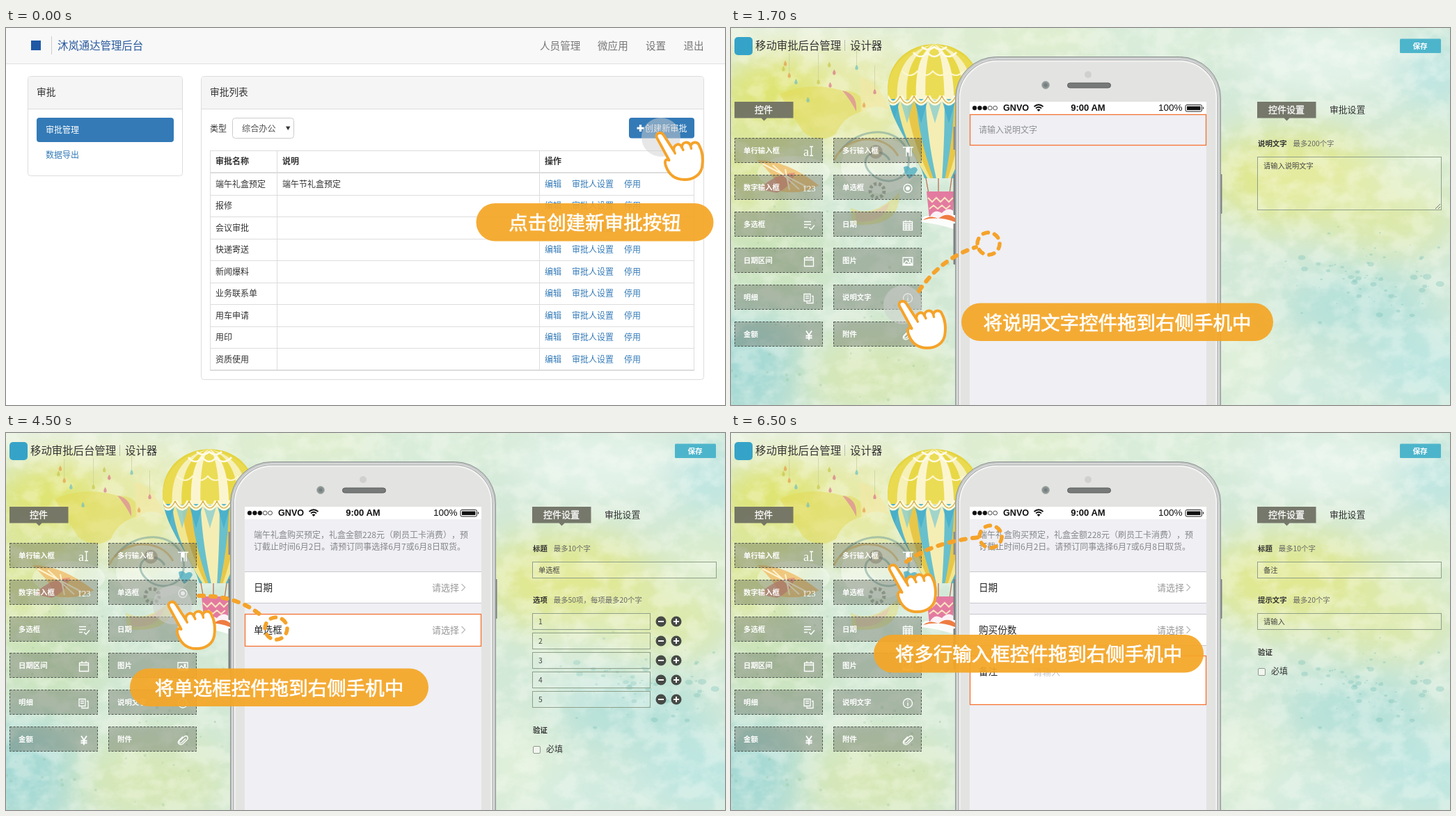
An HTML page for the animation above (8 s loop, 1033 by 542 pixels).

```html
<!DOCTYPE html>
<html lang="zh-CN">
<head>
<meta charset="utf-8">
<style>
html, body { margin: 0; width: 100%; height: 100%; overflow: hidden; background: #fff; }
svg { display: block; width: 1033px; height: 542px; }
text {
  font-family: "Noto Sans CJK SC", "Noto Sans CJK", "Noto Sans", sans-serif;
  text-spacing-trim: space-all;
  white-space: pre;
}
.latin { font-family: "Liberation Sans", Arial, sans-serif; }
.serif { font-family: "Liberation Serif", Times, serif; }
</style>
</head>
<body>
<svg id="stage" viewBox="0 0 1033 542" xmlns="http://www.w3.org/2000/svg"></svg>
<script>
const ORANGE = '#f5a32a', BLUE = '#337ab7', INK = '#333';

const text = (x, y, size, fill, str, extra = '') =>
  `<text x="${x}" y="${y}" font-size="${size}" fill="${fill}" ${extra}>${str}</text>`;
const rect = (x, y, w, h, fill, extra = '') =>
  `<rect x="${x}" y="${y}" width="${w}" height="${h}" fill="${fill}" ${extra}/>`;
const path = (d, fill, extra = '') => `<path d="${d}" fill="${fill}" ${extra}/>`;
const line = (d, color, width = 1, extra = '') =>
  path(d, 'none', `stroke="${color}" stroke-width="${width}" ${extra}`);
const circle = (x, y, r, fill, extra = '') => `<circle cx="${x}" cy="${y}" r="${r}" fill="${fill}" ${extra}/>`;
const ellipse = (x, y, rx, ry, fill, extra = '') =>
  `<ellipse cx="${x}" cy="${y}" rx="${rx}" ry="${ry}" fill="${fill}" ${extra}/>`;
const stroke = color => `stroke="${color}"`;
const BOLD = 'font-weight="700"', MID = 'text-anchor="middle"';

let seed = 7;
const rnd = () => (seed = (seed * 16807) % 2147483647) / 2147483647;
const repeat = (n, fn) => Array.from({ length: n }, (_, i) => fn(i)).join('');

// Pointer, banner and drag trail

const hand = (x, y) => `<g transform="translate(${x} ${y}) scale(.97)" stroke="${ORANGE}" stroke-width="4"
  stroke-linejoin="round" stroke-linecap="round">` +
  path('M-4 3C-7-4 2-7 6-1L21 22C20 13 30 9 33 17C33 9 43 7 46 15C48 8 57 8 59 15C63 22 65 34 63 46' +
    'C61 58 50 65 37 65C21 65 13 56 9 44C7 37 9 34 14 36Z', '#fff') +
  line('M21 22L23 26M33 17L35 21M46 15L47 19', ORANGE, 3.5) + '</g>';
const touch = (x, y) => circle(x, y, 28, '#d0d0d0', 'opacity=".5"');
const banner = (x, y, w, str) => rect(x, y, w, 54.5, '#f5a626', 'rx="27.2" opacity=".93"') +
  text(x + w / 2, y + 38, 27.5, '#fff', str, MID + ' stroke="#fff" stroke-width=".7"');
const trail = (d, cx, cy) =>
  line(d, ORANGE, 6, 'stroke-dasharray="7 10" stroke-linecap="round"') +
  circle(cx, cy, 16, 'none', `stroke="${ORANGE}" stroke-width="5.5" stroke-dasharray="7.3 9.45" stroke-linecap="round"`);

// Approval list page

function listPage() {
  const names = ['端午礼盒预定', '报修', '会议审批', '快递寄送', '新闻爆料', '业务联系单', '用车申请', '用印', '资质使用'];
  const panel = (x, w, h, title) =>
    rect(x + .5, 69.5, w, h, '#fff', 'rx="4" stroke="#ddd"') +
    path(`M${x + 1} 116V73q0-3 3-3h${w - 7}q3 0 3 3v43z`, '#f5f5f5') +
    line(`M${x} 116.5h${w}`, '#ddd') + text(x + 13, 97, 13.7, INK, title);
  const row = i => {
    const y = 228.5 + i * 31.5;
    return text(301, y, 12, INK, names[i]) +
      [[774, '编辑'], [813, '审批人设置'], [888, '停用']].map(([x, s]) => text(x, y, 12, BLUE, s)).join('') +
      line(`M293 ${Math.round(y + 11) + .5}H989`, '#ddd');
  };
  return rect(0, 0, 1033, 542, '#fff') + rect(0, 0, 1033, 51, '#f8f8f8') + line('M0 51.5H1033', '#e0e0e0') +
    rect(36, 18, 14, 14, '#1f58a5') + line('M65.5 12V38', '#ccc') +
    text(74, 31, 15.4, '#2a5b9e', '沐岚通达管理后台') +
    [[767, '人员管理'], [850, '微应用'], [919, '设置'], [973.5, '退出']]
      .map(([x, s]) => text(x, 30.5, 14.6, '#777', s)).join('') +
    panel(31, 222, 143, '审批') + rect(44, 129, 197, 35, BLUE, 'rx="4"') +
    text(57, 151, 12, '#fff', '审批管理') + text(57, 187, 12, BLUE, '数据导出') +
    panel(280, 722, 436, '审批列表') + text(293, 148.5, 12, INK, '类型') +
    rect(325.5, 129.5, 88, 29, '#fff', 'rx="4" stroke="#ccc"') + text(339, 149, 12.2, '#555', '综合办公') +
    path('M402 141.5h6.4l-3.2 5.5z', INK) +
    rect(895, 129, 94, 29.5, BLUE, 'rx="4"') + line('M906.5 144h10M911.5 139v10', '#fff', 3.2) +
    text(918, 148.5, 12.1, '#fff', '创建新审批') +
    rect(293.5, 176.5, 695, 315, 'none', stroke('#ddd')) +
    line('M389.5 176V492M766.5 176V492', '#ddd') + line('M293 208H989', '#ddd', 2) +
    text(301, 196, 12, INK, '审批名称', BOLD) + text(397, 196, 12, INK, '说明', BOLD) +
    text(774, 196, 12, INK, '操作', BOLD) + repeat(9, row) + text(397, 228.5, 12, INK, '端午节礼盒预定') +
    touch(941, 157) + hand(939, 155) + banner(675.5, 252, 341, '点击创建新审批按钮');
}

// Watercolour backdrop

function washes() {
  const spots = [
    [85, 95, 110, 60, '#dfe46c'], [20, 200, 80, 80, '#dce79f'], [190, 110, 70, 90, '#e6eaa6'],
    [60, 5, 180, 25, '#f1f5e4'], [260, 30, 80, 30, '#e6efcc'], [60, 330, 90, 60, '#cae3bb'],
    [20, 490, 80, 80, '#a6d9d4'], [210, 500, 110, 60, '#d6e7b5'], [250, 380, 80, 70, '#d2e8d3'],
    [430, 15, 130, 30, '#e4f0cc'], [640, 15, 110, 35, '#dceedb'], [860, 45, 130, 45, '#e6f4ec'],
    [1010, 70, 50, 60, '#bde5e2'], [810, 215, 130, 70, '#e0e891'], [940, 270, 100, 50, '#dde9a8'],
    [1000, 180, 50, 60, '#dbedcc'], [900, 400, 110, 55, '#b6e1d9'], [740, 480, 60, 70, '#e0f0da'],
    [1000, 490, 90, 60, '#bee6e1'], [850, 520, 90, 30, '#d2ece4']
  ];
  return rect(0, 0, 1033, 542, '#d3e9d8') +
    `<g filter="url(#soft)">${spots.map(s => ellipse(...s)).join('')}</g>` +
    rect(0, 0, 1033, 542, '#fff', 'filter="url(#grain)" opacity=".3"') +
    repeat(70, () => {
      const r = .6 + rnd() * rnd() * 4.5;
      return ellipse(905 + (rnd() + rnd() - 1) * 120, 355 + (rnd() + rnd() - 1) * 70, r * 1.5, r, '#6dbab0', 'opacity=".3"');
    }) +
    repeat(60, () => circle(rnd() * 320, 250 + rnd() * 290, .5 + rnd() * 2, '#8cba8c', 'opacity=".25"'));
}

function balloon() {
  const body = 'M225 92C223 50 255 23 292 23S359 48 359 92C359 138 330 178 320 216H278C268 178 228 138 225 92Z';
  // Vertical panel between two fractions of the width, tapering to the neck
  const edge = f => `C${292 + f * 92} 40 ${292 + f * 82} 130 ${299 + f * 21} 216`;
  const panel = (f, fill) => path(`M292 23${edge(f)}H${299 - f * 21}${`C${292 - f * 82} 130 ${292 - f * 92} 40 292 23Z`}`, fill);
  const panels = colors => colors.map((c, i) => panel(1 - i * .2, c)).join('');
  const hem = repeat(7, i => `M${223 + i * 20} 98q10 20 20 0`);
  return `<clipPath id="bag">${path(body, '#000')}</clipPath>
    <clipPath id="skirt"><rect x="220" y="102" width="145" height="120"/></clipPath>
    <g clip-path="url(#bag)">` + path(body, '#e5d440') +
    panels(['#e9da50', '#f6f0b9', '#e8d846', '#fbf5cf', '#ebdc55']) +
    `<g clip-path="url(#skirt)">${path(body, '#58b9cd')}` +
    panels(['#55b5ca', '#f2e690', '#e8c748', '#68c0cc', '#f5eeb4']) + '</g>' +
    repeat(7, i => path(`M${223 + i * 20} 103l10 34l10-34z`, i % 2 ? '#8dcfd0' : '#45aecb', 'opacity=".8"')) +
    line(hem, '#fff9dc', 7) + line(hem, '#d2a83c', 1.2) +
    line('M262 35q10 12 20 0q10 12 20 0q10 12 22 0M274 27q9 8 18 0q9 8 18 0', '#fffbe9', 2.5) +
    line('M246 62q11 12 22 0q11 12 22 0q11 12 22 0q11 12 22 0', '#fdf7cf', 2) + '</g>' +
    line('M280 216L284 238M298 216V238M317 216L314 238', '#bd7052', 1.3) +
    path('M281 235h40l-3 39h-33z', '#e37ba0') +
    line('M283 244l6 6 6-6 6 6 6-6 6 6 6-6M285 260l6-5 6 5 6-5 6 5 6-5', '#fbe3c1', 2) +
    path('M272 279q4-12 14-8q6-12 17-5q10-11 20 0v24q-27-9-51-11z', '#fff', 'opacity=".9"') +
    path('M276 276q10-8 22-2q12-10 24-1v6q-24-9-46-3z', '#ee7c42');
}

function doodles() {
  const drop = i => {
    const x = 25 + rnd() * 185, y = 45 + rnd() * 65;
    return path(`M${x} ${y}q-4.500 7 0 8q4.500-1 0-8z`, ['#e59b48', '#6fbfc0', '#d9748d', '#c7c74b'][i % 4], 'opacity=".7"') +
      (i % 3 ? '' : line(`M${x} ${y}v-${25 + rnd() * 20}`, '#c8cc9a', .7));
  };
  return path('M70 95Q110 76 160 90Q195 90 188 120Q160 128 151 152Q128 168 104 150Q86 122 70 95Z', '#e3d954', 'opacity=".5"') +
    path('M185 70q30 10 42 48q-24-12-40 5z', '#f2e8a5', 'opacity=".7"') +
    repeat(12, drop) +
    ellipse(212, 198, 54, 40, '#fff', 'opacity=".4"') + ellipse(90, 208, 52, 24, '#fff', 'opacity=".35"') +
    line('M156 178C186 138 244 142 254 180S222 232 200 208S214 166 228 190', '#6d9c98', 3, 'opacity=".5"') +
    line('M148 190C166 152 222 150 240 184', '#e1b45d', 3, 'opacity=".6"') +
    path('M160 90q22 4 20 30q-8-16-20-30z', '#de879b', 'opacity=".7"') +
    circle(208, 178, 10, '#86705c', 'opacity=".4"') + circle(208, 178, 5, '#e8dfb4') +
    circle(210, 234, 10, 'none', 'stroke="#6e7468" stroke-width="5" stroke-dasharray="4 3" opacity=".5"') +
    path('M38 190Q80 190 126 226Q104 240 72 235Q64 214 38 190Z', '#f0bd6a', 'opacity=".8"') +
    path('M40 232Q65 208 92 208Q87 228 66 237Z', '#e2857a', 'opacity=".7"') +
    line('M45 195L110 229M60 197L98 232M78 203L84 233', '#fff3cf', 2) +
    path('M172 258q30 18 70-22q2 54-68 46z', '#e3dc72', 'opacity=".5"') +
    path('M178 262q24 10 50-12q-8 32-48 28z', '#e9b3bd', 'opacity=".4"') +
    path('M248 200q6-4 10 2q8-5 10 2q-4 8-12 13q-7-7-8-17z', '#4dadc0', 'opacity=".8"');
}

// Designer page

const ICONS = [
  '<text class="serif" x="-8" y="6" font-size="18" fill="#fff" stroke="none">a</text><path d="M1-7h5M1 6h5M3.5-7v13"/>',
  '<path d="M-1-6h9M2-6v13M5-6v13M-7-6h5v13"/><path d="M2-6q-5 0-4 4t4 3z" fill="#fff"/>',
  '<text class="serif" x="0" y="4" font-size="12.5" text-anchor="middle" fill="#fff" stroke="none">123</text>',
  '<circle r="6"/><circle r="2.4" fill="#fff"/>',
  '<path d="M-7-5h10M-7-1h10M-7 3h5M0 3l3 3 5-6"/>',
  '<path d="M-6.500-5h13v12h-13zM-6.500-2h13M-6.500 1h13M-6.500 4h13M-2.500-2v9M2-2v9M-3-7v3M3-7v3"/>',
  '<path d="M-6.500-5h13v12h-13zM-6.500-2h13M-3-7.500v3M3-7.500v3"/>',
  '<path d="M-7-5.500h14v11h-14zM-6 4l4-5 3 3 2-2 3 4z"/><circle cx="3" cy="-2" r="1"/>',
  '<path d="M-7-6h9v10h-9zM4-3h2v10h-9v-2M-5-3h5M-5 0h5"/>',
  '<circle r="6.500"/><path d="M0-1v5M0-4v1.500"/>',
  '<path d="M-4-6L0 0L4-6M0 0v7M-4.500 1h9M-4.500 4h9" stroke-width="1.8"/>',
  '<path d="M4-2L-2 4q-2 1-3-.500t1-3L2-5q3-2 4.500 0t0 4L0 5.500q-3 2-5.500 0t0-5L0-5"/>'
];
const LABELS = ['单行输入框', '多行输入框', '数字输入框', '单选框', '多选框', '日期', '日期区间', '图片', '明细', '说明文字', '金额', '附件'];

const control = (label, i) => {
  const x = i % 2 ? 147.5 : 5.5, y = Math.round(159 + (i >> 1) * 52.8) - .5;
  return rect(x, y, 126, 35, 'rgba(85,92,80,.37)', 'stroke="#4c534e" stroke-dasharray="3 2"') +
    text(x + 12.5, y + 21.5, 10.4, '#fff', label, BOLD) +
    `<g transform="translate(${x + 106.5} ${y + 19})" fill="none" stroke="#fff" stroke-width="1.3">${ICONS[i]}</g>`;
};
const tag = (x, label) => path(`M${x} 106h84.500v23.500h-38l-4 4-4-4h-38.500z`, '#6d6e62', 'opacity=".92"') +
  text(x + 42, 122, 13, '#fff', label, MID + ' stroke="#fff" stroke-width=".3"');

function phone() {
  const sides = rect(319.5, 142, 4, 33, '#8b9090') + rect(319.5, 210, 4, 59, '#7d8282', 'rx="1"') +
    rect(319.5, 281, 4, 59, '#7d8282', 'rx="1"') + rect(701.5, 210, 4, 57, '#7d8282', 'rx="1"');
  return sides +
    rect(322.5, 41.5, 381, 600, '#c5c8c7', 'rx="59" stroke="#8e9392"') +
    rect(325.5, 44.5, 375, 600, '#aeb2b1', 'rx="57" stroke="#e7e9e8"') +
    rect(328.5, 47.5, 369, 600, '#e3e4e2', 'rx="54" stroke="#f4f4f3" stroke-width="2"') +
    circle(513, 67, 5, '#cfd0cf') + circle(452, 82, 5.5, '#8a9391', 'stroke="#b2b7b5"') + circle(452, 82, 2.5, '#737f7e') +
    rect(483.5, 79, 62, 7, '#777a79', 'rx="3.5" stroke="#595c5b"') +
    rect(343, 106, 340, 436, '#efeff4') + rect(343, 106, 340, 18, '#fff') +
    repeat(5, i => circle(350 + i * 7.4, 115, 2.9, i < 3 ? '#111' : '#fff', 'stroke="#222" stroke-width=".8"')) +
    text(391, 119, 12.6, '#111', 'GNVO', 'class="latin" ' + BOLD) +
    line('M435.500 113Q442 107.500 448.500 113M438 115.500Q442 112 446 115.500', '#111', 1.8) +
    path('M439.500 117.500q2.500-2 5 0L442 120z', '#111') +
    text(513, 119, 13, '#111', '9:00 AM', 'class="latin" ' + MID + ' ' + BOLD) +
    text(614, 119, 13.5, '#111', '100%', 'class="latin"') +
    rect(653, 110.5, 23.5, 9.5, '#fff', 'rx="2" stroke="#222"') + rect(655, 112.5, 19.5, 5.5, '#111') +
    path('M678 113q2.500 2 0 4z', '#111');
}

function designer() {
  return washes() + doodles() + balloon() +
    rect(5, 13, 26, 26, '#35a3c8', 'rx="5"') +
    text(35, 31, 15.4, INK, '移动审批后台管理') + line('M163.500 17V33', '#b4bfae') + text(171, 31, 15.4, INK, '设计器') +
    rect(961, 15.5, 59, 20.5, '#4db5cb', 'rx="1.5"') + text(990, 30, 10.6, '#fff', '保存', MID + ' ' + BOLD) +
    tag(5, '控件') + tag(756, '控件设置') + text(860, 122, 12.8, INK, '审批设置') +
    LABELS.map(control).join('') + phone();
}

const frame = (y, h, fill = 'none') => rect(343.5, y + .5, 339, h, fill, 'stroke="#f5712f" stroke-width="1.3"');
const field = (y, value, w = 264, h = 23) =>
  rect(756.5, y + .5, w, h, 'rgba(255,255,255,.12)', 'stroke="#8fa08a"') + (value ? text(765, y + 16, 10.3, '#444', value) : '');
const caption = (y, title, hint = '') => text(757, y, 10.4, INK, title, BOLD) +
  text(757 + title.length * 10.4 + 9, y, 10.4, '#666', hint);
const notes = lines => caption(170, '说明文字', '最多200个字') + field(185, '', 264, 76) +
  lines.map((s, i) => text(765, 202 + i * 13.5, 10.25, '#444', s)).join('') +
  line('M1012 260l7-7M1016 260l3-3', '#777');
const required = y => caption(y, '验证') + rect(757.5, y + 19.5, 10, 10, '#f0f5ee', 'rx="1.5" stroke="#92998f"') +
  text(776, y + 27.5, 12, INK, '必填');
const intro = text(356, 151, 12, '#85878a', '端午礼盒购买预定，礼盒金额228元（刷员工卡消费），预') +
  text(356, 168, 12, '#85878a', '订截止时间6月2日。请预订同事选择6月7或6月8日取货。');
const pick = (y, label, bordered = true) => rect(343, y, 340, 46, '#fff') +
  (bordered ? line(`M343 ${y + .5}h340M343 ${y + 45.5}h340`, '#c8c7cc') : frame(y, 46)) +
  text(356, y + 27.5, 13.6, '#222', label) + text(612, y + 27.5, 13, '#999', '请选择') +
  line(`M654.500 ${y + 18}l5 5-5 5`, '#bbb', 1.3);
const optionRow = i => {
  const y = 259 + i * 28, c = y + 12;
  return field(y, String(i + 1), 169) + circle(941, c, 7.5, '#464a46') + circle(963, c, 7.5, '#464a46') +
    line(`M937 ${c}h8M959 ${c}h8M963 ${c - 4}v8`, '#fff', 2);
};

const noteStep = () => frame(124, 44) + text(356, 151, 12, '#8d8f93', '请输入说明文字') + notes(['请输入说明文字']) +
  touch(247, 398) + trail('M270 378Q302 331 352 315', 370, 310) + hand(246, 397) +
  banner(331, 395.5, 448, '将说明文字控件拖到右侧手机中');

const typeStep = () => frame(124, 61) + intro +
  notes(['端午礼盒购买预定，礼盒金额228元（刷员工卡消', '费），预订截止时间6月2日。请预订同事选择6月7或6', '月8日取货。']) +
  touch(841, 246) + hand(840, 249) + banner(592, 344.5, 424, '在右侧输入框中填写说明文字');

const radioStep = () => intro + pick(199, '日期') + pick(260, '单选框', false) +
  caption(170, '标题', '最多10个字') + field(185, '单选框') +
  caption(244, '选项', '最多50项，每项最多20个字') + repeat(5, optionRow) + required(431) +
  touch(239, 247) + trail('M277 234C318 234 346 244 371 266', 388, 281) + hand(238, 247) +
  banner(178, 338.5, 429, '将单选框控件拖到右侧手机中');

const remarkStep = () => intro + pick(199, '日期') + pick(260, '购买份数') + frame(320, 70, '#fff') +
  text(356, 348, 13.6, '#222', '备注') + text(434, 348, 13, '#c2c2c6', '请输入') +
  caption(170, '标题', '最多10个字') + field(185, '备注') +
  caption(244, '提示文字', '最多20个字') + field(259, '请输入') + required(319) +
  trail('M252 185Q290 157 356 150', 373, 149) + hand(232, 194) +
  banner(205, 290, 474, '将多行输入框控件拖到右侧手机中');

const steps = [[0, listPage], [500, noteStep], [2500, typeStep], [4500, radioStep], [6500, remarkStep]];
const LOOP = 8000;

const stage = document.getElementById('stage');
stage.innerHTML = `<defs>
  <filter id="soft" x="-20%" y="-30%" width="140%" height="160%"><feGaussianBlur stdDeviation="28"/></filter>
  <filter id="grain" x="0" y="0" width="100%" height="100%">
    <feTurbulence type="fractalNoise" baseFrequency=".03 .04" numOctaves="6" seed="4"/>
    <feColorMatrix values="0 0 0 0 1  0 0 0 0 1  0 0 0 0 .95  3.5 0 0 0 -1.4"/>
  </filter></defs><g id="designer">${designer()}</g>` +
  steps.map(([, draw]) => `<g class="step">${draw()}</g>`).join('');

const groups = [...stage.querySelectorAll('.step')];
const start = performance.now();
let shown = -1;

function tick() {
  const t = (performance.now() - start) % LOOP;
  const now = steps.filter(([at]) => at <= t).length - 1;
  if (now !== shown) {
    groups.forEach((g, i) => { g.style.display = i === now ? '' : 'none'; });
    shown = now;
  }
  requestAnimationFrame(tick);
}
tick();
</script>
</body>
</html>
```
